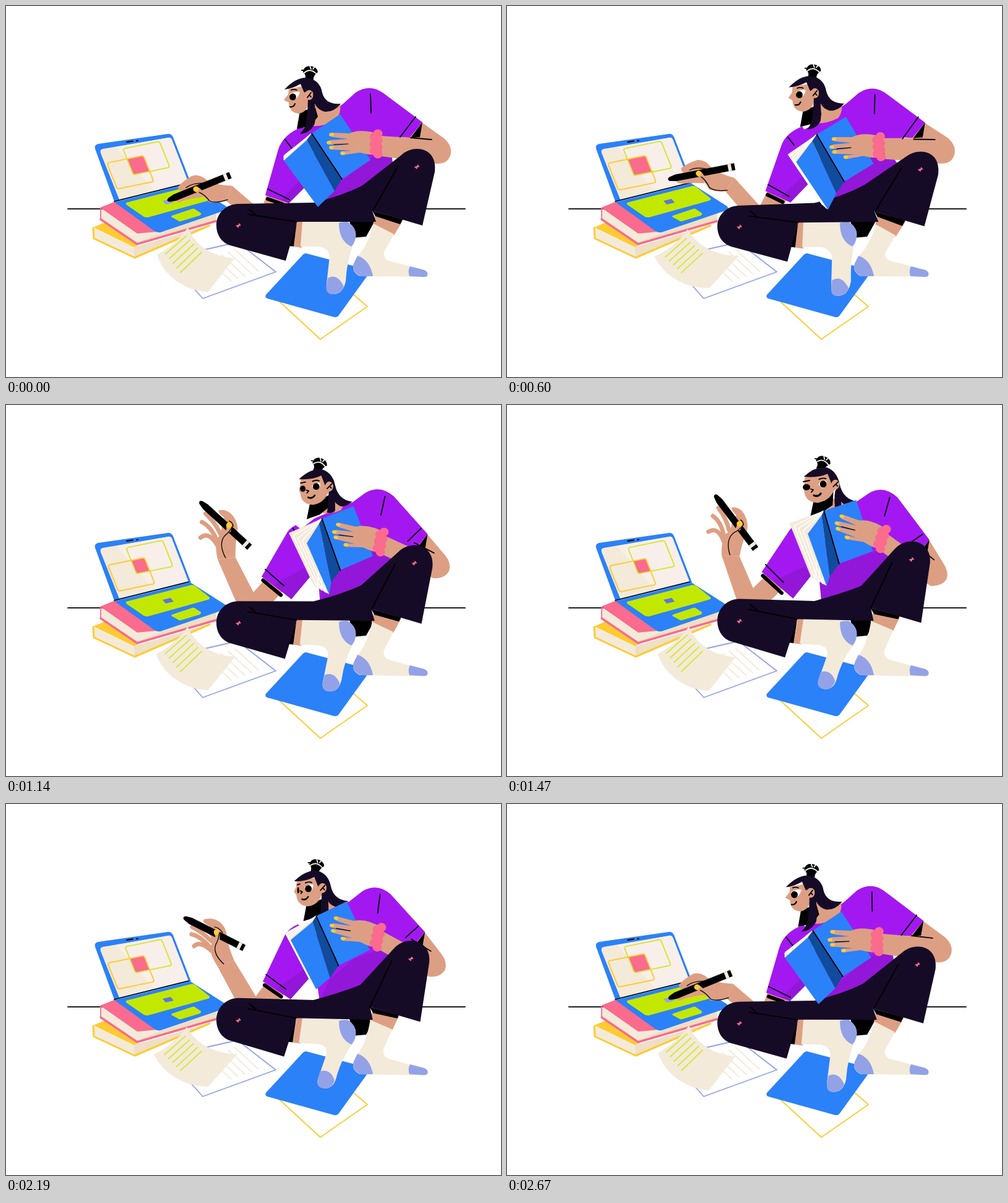
An HTML page with a canvas for the animation above (2.7 s loop, 800 by 600 pixels).

```html
<!DOCTYPE html>
<html lang="en">
<head>
<meta charset="utf-8">
<title>Studying on the floor</title>
<style>
  html, body { margin: 0; width: 100%; height: 100%; overflow: hidden; background: #fff; }
  canvas { display: block; }
</style>
</head>
<body>
<canvas id="stage" width="800" height="600"></canvas>
<script>
const c = document.getElementById('stage').getContext('2d');
const LOOP = 2700;
const BLUE = '#2b81f8', NAVY = '#104b9c', CREAM = '#f3eada', TAN = '#eedfc5', PINK = '#fa6b8d',
  YELLOW = '#ffcb33', LIME = '#c3e800', OLIVE = '#d7e535', LILAC = '#93a2e6', SKIN = '#dd9f83',
  PURPLE = '#a318f0', PLUM = '#9217d8', NIGHT = '#160b26', BLACK = '#000';

c.lineCap = c.lineJoin = 'round';
const fill = (d, color) => { c.fillStyle = color; c.fill(new Path2D(d)); };
const line = (d, color = BLACK, width = 1.8) => {
  c.strokeStyle = color; c.lineWidth = width; c.stroke(new Path2D(d));
};
const dot = (x, y, rx, ry, color) => {
  c.fillStyle = color; c.beginPath(); c.ellipse(x, y, rx, ry, 0, 0, 7); c.fill();
};
const group = (x, y, degrees, draw) => {
  c.save(); c.translate(x, y); c.rotate(degrees * Math.PI / 180); draw(); c.restore();
};
const lerp = (a, b, k) => a + (b - a) * k;
const between = (a, b, k) => a.map((v, i) => lerp(v, b[i], k));
const poly = points => 'M' + points.map(p => p.join(' ')).join('L') + 'z';
const ramp = (t, from, to) => Math.min(1, Math.max(0, (t - from) / (to - from)));
const ease = u => (1 - Math.cos(Math.PI * u)) / 2;

// Blends two paths with the same commands.
const mix = (a, b, k) => {
  const ends = b.match(/-?[\d.]+/g);
  let i = 0;
  return a.replace(/-?[\d.]+/g, v => lerp(+v, +ends[i++], k).toFixed(2));
};

// All body parts follow the same slow circle, each with its own lag.
function motion(t) {
  const rise = ease(2 * t / LOOP), wave = Math.sin(2 * Math.PI * t / LOOP);
  return {
    wave,
    sway: 0.03 * ramp(t, 0, 200) * ramp(t, LOOP, 2500) + 0.98 * rise - 0.24 * wave,
    bend: 0.95 * rise - 0.52 * wave,
    kick: 0.75 * rise - 0.7 * wave,
    lift: ease(ramp(t, 330, 1400)) - ramp(t, 1500, 2670) ** 2,
    pulse: Math.sin(Math.PI * ramp(t, 0, 660)),
    curl: ease(4 * t / LOOP),
  };
}

function books() {
  fill('M141 359L207 390 330 354 208 407 142 376z', CREAM);
  fill('M207 390L330 354 300 367 208 407z', TAN);
  fill('M141 358L162 349 215 386 207 390z', YELLOW);
  line('M141 359L142 376 208 407 329 355', YELLOW, 3);
  fill('M152 327L212 368 338 334 340 347 212 385 153 345z', CREAM);
  fill('M212 368L340 332 340 347 212 385z', TAN);
  fill('M212 368L250 366 290 352 212 382z', CREAM);
  fill('M152 326L177 316 243 365 212 368z', PINK);
  line('M153 345L212 385 339 348', PINK, 3.5);
  line('M153 327V345', PINK);
}

function frameRect(x, y, size) {
  c.transform(1, -0.205, 0.4, 1, x, y);
  c.beginPath();
  c.roundRect(0, 0, 59 * size, 42 * size, 3);
}

function laptop({ sway, lift, pulse }) {
  fill('M175 316L144 231Q142 225 149 223L261 207Q267 206 270 212L299 287z', BLUE);
  fill('M183 313L153 238Q151 232 157 231L262 213Q266 212 268 216L295 286z', CREAM);
  fill('M178 228L262 213Q266 212 268 216L295 286 240 299z', '#f8efea');
  const size = 1 + 0.12 * pulse;
  const green = [189 + 6 * sway - 8 * pulse, 231, size];
  const amber = [163 + 2 * sway - 2 * pulse, 254 + 6 * sway - 3 * pulse, size];
  c.save(); frameRect(...green); c.clip();
  c.setTransform(1, 0, 0, 1, 0, 0);
  frameRect(...amber); c.fillStyle = PINK; c.fill(); c.restore();
  for (const [rect, color] of [[green, OLIVE], [amber, YELLOW]]) {
    c.save(); frameRect(...rect); c.restore();
    c.strokeStyle = color; c.lineWidth = 2; c.stroke();
  }
  line('M195 220L205 218.500M211 218L213 217.700');
  fill('M175 317L298 287 356 324Q359 328 353 331L250 366Q245 367 240 364z', BLUE);
  fill('M194 318L300 291Q303 291 305 292L329 311Q330 314 326 315L229 342Q226 342 223 341L194 321z', LIME);
  fill('M268 339L301 328Q304 327 306 329L315 335Q316 337 313 339L283 348Q280 349 278 347L267 341z', LIME);
  fill('M253 315L266 312 271 318 258 321z', lift + pulse < 0.2 ? LILAC : '#5d76dc');
  line('M175 316L295 286');
}

function papers({ curl }) {
  line('M318 473L436 430 374 382 260 408z', LILAC);
  for (let i = 0; i < 5; i++) line(`M${370 - 11 * i} ${394 + 4 * i}l38 35`, CREAM);
  fill(mix('M294 358C305 385 330 405 369 408L326 463C290 460 255 438 244 402Q276 385 294 358z',
    'M292 361C305 385 334 404 375 404L327 456C290 457 255 438 238 405Q272 390 292 361z', curl), CREAM);
  for (let i = 0; i < 5; i++)
    line(mix(`M${258 + 6 * i} ${401 + 7.5 * i}L${291 + 6.3 * i} ${372 + 6.5 * i}`,
      `M${256 + 6.5 * i} ${406 + 6.3 * i}L${290 + 6.5 * i} ${376 + 6 * i}`, curl), OLIVE);
  line('M508 539L584 486 519 430 430 467z', YELLOW);
  fill('M485 400L590 428 538 500Q535 504 530 503L422 473Q418 471 420 467L480 402Q482 400 485 400z', BLUE);
}

// Outer end of the right sleeve's hem.
const hem = ({ bend, wave }) => [673 + 10 * bend + 4 * wave, 188 + 29 * bend + 4 * wave];

function torso(m) {
  const s = m.sway, [hx, hy] = hem(m);
  line(mix('M437 312L424 348', 'M431 289L390 330', s), SKIN, 34);
  line(mix('M423 312L446 320', 'M414 278L444 305', s), BLACK, 6);
  fill(mix('M480 195Q448 207 440 232L419 306 457 319 492 284 505 240z',
    'M466 194Q459 198 455 205L412 272 462 313 491 277 480 200z', s), PURPLE);
  fill(mix('M482 275L492 284 457 319 445 313z', 'M481 262L491 277 462 313 431 286z', s), PLUM);
  line(mix('M423 296L458 313', 'M418 260L447 288', s));
  fill(mix('M470 205L500 192 545 158 600 150 620 230 625 262 505 318 490 250z',
    'M478 200L498 182 563 157 610 150 640 230 600 290 508 318 506 270z', s), PURPLE);
  fill(mix('M506 318L545 282 590 246 622 230 626 262 560 305z',
    'M508 318L507 284 538 256 592 238 650 225 600 298z', s), PLUM);
  line(mix('M451 216L462 230', 'M466 196L472 206', s));
  fill(mix('M545 158L565 140Q588 125 610 141', 'M563 157L583 143Q607 128 630 149', s)
    + `L${hx} ${hy} ${hx - 20} ${hy + 25} ${hx - 36} ${hy + 24} 600 230 545 230z`, PURPLE);
  line(mix('M589 142L590 173', 'M617 149L609 179', s));
}

function head({ sway: s }) {
  group(lerp(490, 508, s), lerp(107, 93, s), 12 * s, () => {
    fill('M-10 0Q-9-10 1-10 13-9 14 0 6 6 7 12H-7Q-4 4-10 0z', BLACK);
    line('M-8 1Q2-8 13 4M1-10L3-5M6-5L9-9', '#fff', 1.7);
    line('M-12-3L-8-3');
  });
  fill(mix('M494 160L540 158Q542 172 534 184 514 196 490 194z',
    'M522 150L545 160Q546 164 542 168 532 172 516 172z', s), SKIN);
  fill(mix('M475 170L500 165 504 179 492 194 470 199z', 'M494 158L526 142 525 163 510 174 489 182z', s), BLACK);
  fill(mix('M457 134L456 143 449 152 457 156Q457 172 473 174 486 172 489 158L497 145 490 128z',
    'M480 118L479 128 478 134 479 140Q481 159 501 159 518 156 525 142L534 130 525 110z', s), SKIN);
  fill(mix('M450 135Q472 112 491 117 508 122 511 140 516 160 541 158 530 172 515 171 504 168 499 158 501 180 499 190 492 206 475 207 486 196 486 180 488 165 488 150L496 140Q492 134 482 140L476 126Q462 134 450 135z',
    'M478 117Q497 99 516 102 532 108 536 128 541 152 563 156 552 165 545 162 538 158 538 156 538 164 538 168 534 170 527 168 527 160 527 155 527 148 528 140L535 128Q530 122 522 128L516 112Q500 119 478 117z', s), NIGHT);
  dot(lerp(490, 528.5, s), lerp(144, 129.5, s), 6.5, 8, SKIN);
  line(mix('M487 148L490 144 493 140M490 144L493 147', 'M525 133L529 129 533 125M529 129L532 132', s));
  fill(mix('M458 143Q468 137 475 139 472 151 463 152z', 'M501 129Q506 121 514 124 516 133 507 136z', s), '#fff');
  dot(lerp(463.5, 508.5, s), lerp(147, 129, s), 5.4, 5.6, BLACK);
  const turn = ramp(s, 0.4, 1);
  if (turn) {
    dot(lerp(468, 484, turn), lerp(142, 133, turn), 6 * turn, 5, BLACK);
    line(mix('M470 142L473 144 471 146', 'M491 136L495 137 492 141', turn));
    line(mix('M468 133L470 132', 'M479 124Q484 121 489 122'.replace('Q484 121 ', 'L'), turn));
  }
  line(mix('M461 136Q465 134 470 136', 'M502 121Q508 118 513 120', s));
  line(mix('M459 163Q465 164 467 158', 'M494 147Q500 150 505 144', s), BLACK, 2 + s);
}

function book({ sway, wave }) {
  const at = (x0, y0, x1, y1, slide = 0) =>
    [lerp(x0, x1, sway) + slide * wave, lerp(y0, y1, sway) + slide * wave / 4];
  const top = at(494, 206, 512, 175), spine = at(543, 280, 538, 260),
    right = at(540, 175, 564, 157), corner = at(589, 249, 592, 239),
    edge = at(486, 217, 508, 183), fold = at(531, 299, 523, 280),
    foot = at(504, 325, 519, 297, 9), left = at(449, 250, 487, 213, 8),
    page = at(449, 241, 457, 196);
  const pageFoot = foot.map((v, i) => v + (page[i] - left[i]) * 0.85);
  group(3 * wave, 8 * wave, 0, () => {
    fill(poly([page, top, foot, pageFoot]), CREAM);
    for (const k of [0.25, 0.5, 0.75])
      line(poly([top, between(page, left, k), between(pageFoot, foot, k)]), '#fff', 1.5);
    fill(poly([top, right, corner, spine]), BLUE);
    fill(poly([edge, fold, foot, left]), BLUE);
    fill(poly([top, spine, fold, edge]), NAVY);
    line(poly([top, spine]));
  });
}

function drawingArm({ lift, pulse }) {
  const x = 307 + 69 * lift ** 1.7, y = 296 - 104 * Math.sin(lift * Math.PI / 2) - 5 * pulse * (1 - lift);
  const angle = -22 + 75 * lift, open = ease(lift);
  const turn = angle * Math.PI / 180, cos = Math.cos(turn), sin = Math.sin(turn);
  const place = ([u, v]) => [x + u * cos - v * sin, y + u * sin + v * cos];
  fill(poly([
    place(between([56, 17], [42, 32], open)), between([425, 342], [408, 320], lift),
    between([388, 340], [378, 335], lift), place(between([38, 36], [23, 54], open))]), SKIN);
  group(x, y, angle, () => {
    line(mix('M-33 6Q-20 6 0 8', 'M-41 12Q-20 12-2 20', open), SKIN, 7);
    line(mix('M-30 6Q-20 6 2 10', 'M-36 27Q-20 22 0 32', open), SKIN, 7);
    line(mix('M-28 6Q-18 7 4 12', 'M-20 48Q-18 30 8 38', open), SKIN, 7);
    fill(mix('M56 17Q30 5 21-8 14-21 2-22-14-20-26-14-28-4-14-2L-30 2Q-40 6-33 10L-6 7Q8 12 12 28 22 34 38 36z',
      'M42 32Q26 14 18 8 10-12-6-15-20-18-29-6-26-2-14-4L-14-2Q-14 4-10 6L-8 10Q0 16 0 30 6 42 23 54z', open), SKIN);
    group(-50 - 12 * open, 4 * open, 0, () => {
      fill('M0 0Q1-3 4-3.500L13-5.500H110V5.500H13L4 3.500Q1 3 0 0z', BLACK);
      fill('M99-5.500H104.500V5.500H99z', CREAM);
    });
    fill(mix('M-3 0L5-1 11 11 8 16Q4 8-3 4z', 'M-3-2L4-4 9 6 4 15Q2 6-4 3z', open), SKIN);
    dot(0, 0, 4.6, 4.4, YELLOW);
    line(mix('M3 7Q10 14 13 26 20 34 41 35', 'M5-4Q8 8 6 16 6 34 31 43', open), BLACK, 1.3);
    line(mix('M-14-8Q0-12 20-2', 'M-4-5Q0-7 5-4', open), BLACK, 1.3);
  });
}

function bookArm(m) {
  const { bend, wave } = m, [hx, hy] = hem(m);
  group(4 * wave, 4 * wave, 0, () => {
    fill(mix('M673 189L708 214Q723 228 718 242 713 256 695 255L607 243 605 210 652 213z',
      'M683 218L707 255Q716 268 712 280 704 292 686 291L606 238 617 211 663 242z', bend), SKIN);
    line(mix('M654 213L688 216', 'M660 225L691 249', bend));
  });
  fill(`M${hx} ${hy}L${hx - 4} ${hy + 24} ${hx - 19} ${hy + 25}z`, BLACK);
  line(`M${hx - 11} ${hy - 9}L${hx - 36 + 6 * bend} ${hy + 24 - 19 * bend}`);
  group(lerp(597, 605, bend) + 4 * wave, lerp(223, 217, bend) + 4 * wave, 16 * bend, () => {
    fill('M8-15Q-22-26-42-17L-69-18Q-76-15-69-11L-44-8-73-6Q-80-2-73 1L-44 1-69 3Q-77 6-70 9L-37 11-52 12Q-58 15-52 18L-25 14Q-8 19 8 17z', SKIN);
    for (const [u, v] of [[-71, -15], [-75, -2], [-71, 6], [-53, 15]]) dot(u, v, 3.8, 2.9, YELLOW);
    line('M-67 1L-44 0', BLACK, 1.2);
    for (let i = -3; i <= 3; i++) dot(i % 2 ? 4 : -2, i * 5.5, 7.5, 7, PINK);
  });
}

function feet(q) {
  fill('M555 346H597L582 373 560 375z', BLACK);
  fill(mix('M470 348H481L478 391 465 389z', 'M470 345H481L476 387 463 385z', q), SKIN);
  fill(mix('M479 349L552 349Q572 362 562 384 551 410 549 445 545 466 529 466 516 466 518 450L523 405Q521 390 503 389L476 389z',
    'M479 346L552 349Q572 362 562 386 541 410 531 445 526 460 512 459 499 457 502 445L517 405Q519 389 503 388L473 386z', q), CREAM);
  fill(mix('M520 440Q536 432 546 454 541 466 528 466 516 466 518 452z',
    'M506 431Q523 427 529 446 525 460 512 459 499 457 502 445z', q), LILAC);
  fill('M538 351Q541 349 552 349 572 362 562 384L558 389Q538 380 538 351z', LILAC);
  fill(mix('M597 336L642 346 627 371 593 353z', 'M592 334L634 343 624 365 587 350z', q), SKIN);
  fill(mix('M594 352L627 369 611 398Q609 410 622 413L676 427Q683 430 681 436 679 439 672 438L572 437Q558 430 562 418L568 405Q585 387 594 352z',
    'M588 349L624 364 610 396Q608 410 622 413L676 428Q684 431 682 436 679 440 672 439L572 437Q558 430 562 418L568 405Q582 387 588 349z', q), CREAM);
  fill('M568 404Q588 410 593 437L573 437Q555 428 564 412z', LILAC);
  fill('M653 421L676 427Q683 430 681 436 679 439 672 438L652 437Q649 428 653 421z', LILAC);
}

const star = (x, y) => group(x, y, 0, () => fill('M-4.500 0L0-1 1-4 4.500 0 1 1 0 4z', PINK));

function nearLeg(q) {
  fill(mix('M470 349L465 389 457 388z', 'M469 346L463 385 455 384z', q), BLACK);
  fill(mix('M376 320L497 318Q540 308 575 291L592 331 598 349 470 349 452 412 362 387C350 383 340 372 340 354 340 335 356 320 376 320z',
    'M376 313L497 317Q540 305 572 293L588 329 592 349 469 346 449 408 362 382C350 378 340 366 340 348 340 329 356 313 376 313z', q), NIGHT);
  line(mix('M391 337L470 349M393 329L404 338', 'M391 330L469 346M393 322L404 331', q));
  star(375.5, lerp(355, 349, q));
}

function farLeg(q) {
  fill(mix('M592 331L641 345 637 353 597 340z', 'M587 328L634 341 632 346 593 338z', q), BLACK);
  fill(mix('M560 299L575 291 639 241C660 222 698 230 693 268L673 355 592 331z',
    'M560 299L572 293 625 233C647 208 686 220 683 254L669 352 587 328z', q), NIGHT);
  line(mix('M633 260L593 331', 'M622 253L587 329', q));
  star(lerp(664, 653, q), lerp(260, 249, q));
}

function draw(now) {
  const m = motion(Math.floor(now / 30) * 30 % LOOP);
  c.clearRect(0, 0, 800, 600);
  line('M100 328.200H742');
  books();
  laptop(m);
  papers(m);
  torso(m);
  head(m);
  drawingArm(m);
  feet(m.kick);
  nearLeg(m.kick);
  book(m);
  bookArm(m);
  farLeg(m.kick);
  requestAnimationFrame(draw);
}
requestAnimationFrame(draw);
</script>
</body>
</html>
```
